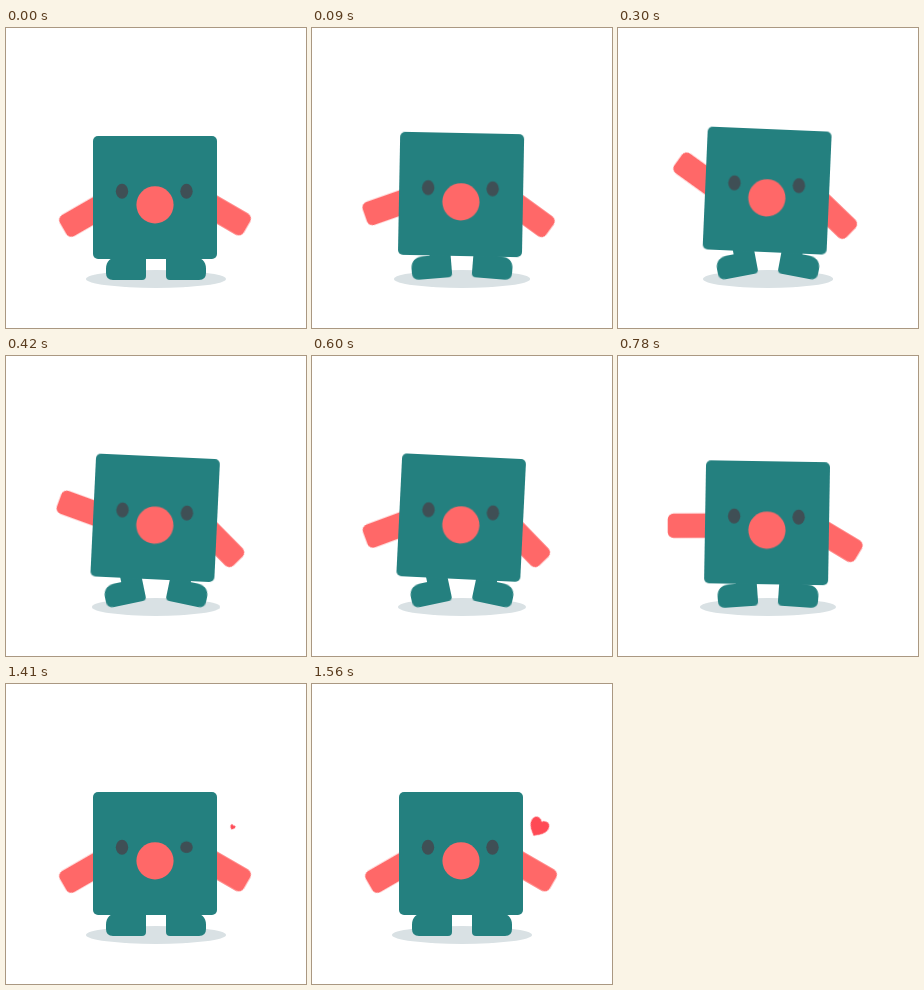
Recreate the animation shown at these times as an HTML page without scripts. Size 300 by 300 pixels, loop 1.8 s.

```html
<!DOCTYPE html>
<html lang="en">
<head>
<meta charset="utf-8">
<title>Waving cube</title>
<style>
  html, body { margin: 0; width: 100%; height: 100%; overflow: hidden; background: #fff; }
  svg { display: block; width: 100%; height: 100%; }

  .teal { fill: #24807f; }
  .coral { fill: #ff6868; }
  .dark { fill: #3f4f55; }

  .move { animation: 1.8s infinite; }

  /* Lean: rise until 30%, stay, settle by 50% */
  .shadow { transform-origin: 150px 251px; animation-name: shadow; }
  .body { transform-origin: 149px 169.5px; animation-name: lean; }
  .foot { transform-origin: 103px 246px; animation-name: foot; }
  .arm-r { transform-origin: 193.4px 171.5px; animation-name: drop; }
  .arm-l { transform-origin: 104.7px 173px; animation-name: wave; animation-timing-function: ease-in-out; }
  .wink { transform-origin: 180.5px 163px; animation-name: wink; animation-timing-function: ease-in-out; }
  .heart { animation-name: pop; }

  @keyframes shadow {
    0% { transform: none; animation-timing-function: cubic-bezier(.25, .46, .45, .94); }
    30%, 33.6% { transform: scaleX(.914); animation-timing-function: ease-in-out; }
    50%, 100% { transform: none; }
  }
  @keyframes lean {
    0% { transform: translate(0, 0) rotate(0deg); animation-timing-function: cubic-bezier(.23, .53, .4, 1); }
    30%, 33.6% { transform: translate(.2px, -7.9px) rotate(2.8deg); animation-timing-function: ease-in-out; }
    50%, 100% { transform: translate(0, 0) rotate(0deg); }
  }
  @keyframes foot {
    0% { transform: rotate(0deg); animation-timing-function: cubic-bezier(.23, .53, .4, 1); }
    30%, 33.6% { transform: rotate(-12deg); animation-timing-function: ease-in-out; }
    50%, 100% { transform: rotate(0deg); }
  }
  @keyframes drop {
    0% { transform: rotate(30deg); animation-timing-function: cubic-bezier(.23, .53, .4, 1); }
    30%, 33% { transform: rotate(43deg); animation-timing-function: ease-in-out; }
    43.3%, 100% { transform: rotate(30deg); }
  }
  @keyframes wave {
    0% { transform: rotate(-30deg); }
    18.9% { transform: rotate(35deg); }
    31.1% { transform: rotate(-28deg); }
    40% { transform: rotate(8deg); }
    50%, 100% { transform: rotate(-30deg); }
  }
  @keyframes wink {
    0%, 76.67% { transform: scaleY(1); }
    81.67% { transform: scaleY(.1); }
    86.67%, 100% { transform: scaleY(1); }
  }
  @keyframes pop {
    0%, 76.67% { transform: scale(0); animation-timing-function: ease-out; }
    86.67%, 100% { transform: scale(1); }
  }
</style>
</head>
<body>
<svg viewBox="0 0 300 300">
  <defs>
    <path id="foot" d="M119 205H140V248Q140 252 136 252H107Q100 252 100 245V241C100 233 105 229 112 229H119Z"/>
  </defs>

  <ellipse class="move shadow" cx="150" cy="251" rx="70" ry="9" fill="#d9e1e4"/>

  <g class="teal">
    <use class="move foot" href="#foot"/>
    <g transform="matrix(-1 0 0 1 300 0)"><use class="move foot" href="#foot"/></g>
  </g>

  <g class="move body">
    <rect class="coral move arm-l" x="49.7" y="160.75" width="56" height="24.5" rx="6"/>
    <rect class="coral move arm-r" x="192.4" y="159.25" width="56" height="24.5" rx="6"/>
    <rect class="teal" x="87" y="108" width="124" height="123" rx="5"/>
    <ellipse class="dark" cx="116" cy="163.2" rx="6.2" ry="7.5"/>
    <ellipse class="dark move wink" cx="180.5" cy="163.2" rx="6.2" ry="7.5"/>
    <circle class="coral" cx="149" cy="176.8" r="18.6"/>
  </g>

  <g transform="translate(226.5 143.2) rotate(30)">
    <path class="move heart" fill="#ff4a55" d="M0-6C-2-10-9.5-10-9.5-3C-9.5 3-3 7 0 10C3 7 9.5 3 9.5-3C9.5-10 2-10 0-6Z"/>
  </g>
</svg>
</body>
</html>
```
